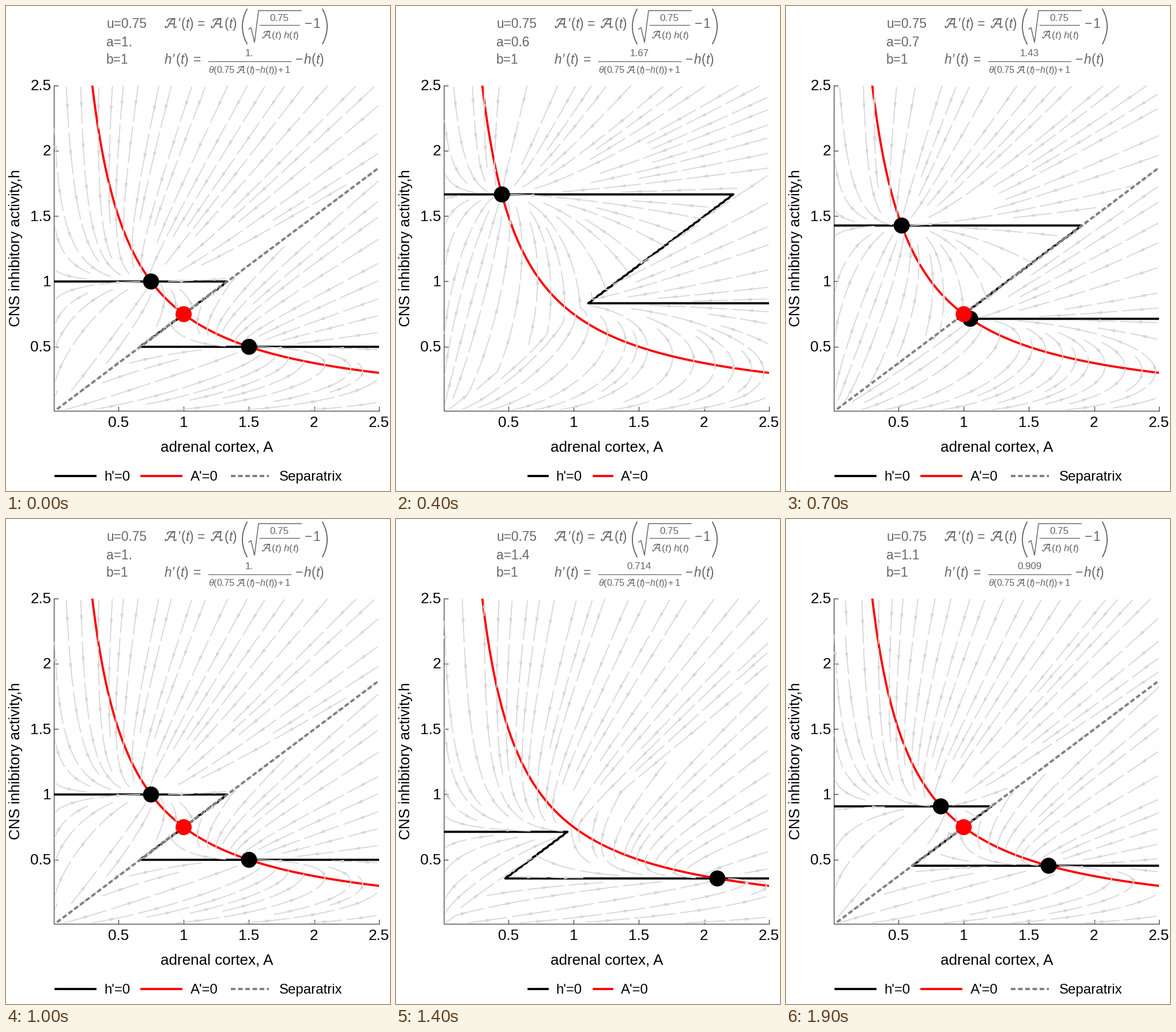
These frames come from a looping animation (666 by 841 pixels, 2000 ms). A matplotlib script:

```python
import math
from functools import lru_cache

import matplotlib.pyplot as plt
import numpy as np
from matplotlib.animation import FuncAnimation
from matplotlib.collections import LineCollection, PolyCollection
from matplotlib.patches import PathPatch, Rectangle
from matplotlib.path import Path

W, H, DPI = 666, 841, 100
PT = 72 / DPI
LEFT, RIGHT, TOP, BOTTOM = 83, 647, 137.5, 701.5
X0, Y0, UNIT = 81.7, 704.2, 226.5     # pixel place of the origin, pixels per unit
U = 0.75
GREY, PALE = "#666666", "#d7d7d7"
STEP, NEAR, APART = 4, 10, 18         # streamline spacing in pixels

plt.rcParams["font.family"] = "Liberation Sans"
fig = plt.figure(figsize=(W / DPI, H / DPI), dpi=DPI, facecolor="white")
ax = fig.add_axes([0, 0, 1, 1])
ax.set_xlim(0, W)
ax.set_ylim(H, 0)
ax.axis("off")
box = Rectangle((LEFT, TOP), RIGHT - LEFT, BOTTOM - TOP, fill=False, lw=0)
ax.add_patch(box)


def px(A):
    return X0 + UNIT * np.asarray(A)


def py(h):
    return Y0 - UNIT * np.asarray(h)


def say(x, y, text, size, color="black", **kw):
    return ax.text(x, y, text, fontsize=size * PT, color=color, va="baseline", **kw)


def line(x, y, width, color, clip=False, **kw):
    item = ax.plot(x, y, lw=width * PT, color=color, **kw)[0]
    if clip:
        item.set_clip_path(box)
    return item


def script_a(x, y, size):
    """Calligraphic capital A drawn with a pen: leg, top stroke, stem, bar."""
    pen = [(Path.MOVETO, 0.06, 0.12), (Path.CURVE4, 0.02, -0.06),
           (Path.CURVE4, 0.2, -0.04), (Path.CURVE4, 0.3, 0.16),
           (Path.CURVE4, 0.42, 0.38), (Path.CURVE4, 0.5, 0.64),
           (Path.CURVE4, 0.78, 0.69),
           (Path.MOVETO, 0.2, 0.5), (Path.CURVE4, 0.2, 0.66),
           (Path.CURVE4, 0.36, 0.69), (Path.CURVE4, 0.78, 0.69),
           (Path.LINETO, 0.72, 0.08), (Path.CURVE4, 0.72, -0.02),
           (Path.CURVE4, 0.82, -0.02), (Path.CURVE4, 0.9, 0.07),
           (Path.MOVETO, 0.34, 0.29), (Path.LINETO, 0.74, 0.29)]
    pts = [(x + u * size, y - v * size) for _, u, v in pen]
    ax.add_patch(PathPatch(Path(pts, [p[0] for p in pen]), fill=False, ec=GREY,
                           lw=0.082 * size * PT, capstyle="round",
                           joinstyle="round"))


def formula(y, size, *parts):
    """Place runs on one baseline; a leading '/' means italic, '@' the script A."""
    for x, text in parts:
        if text == "@":
            script_a(x, y, size)
        elif text[0] == "/":
            say(x, y, text[1:], size, GREY, style="italic")
        else:
            say(x, y, text, size, GREY)


def of_t(x, size):
    """The runs of '(t)' starting at x."""
    return (x, "("), (x + 0.333 * size, "/t"), (x + 0.611 * size, ")")


def num(v):
    s = f"{v:.3g}"
    return s if "." in s else s + "."


# ---- header ----
BIG, SMALL = 22.6, 17
say(174, 37.5, "u=0.75", BIG, GREY)
a_text = say(174, 69.5, "", BIG, GREY)
say(174, 100, "b=1", BIG, GREY)

formula(37.5, BIG, (275, "@"), (298, "′"), *of_t(304, BIG), (332, "="),
        (355, "@"), *of_t(379, BIG), (518, "−"), (532, "1"))
say(474, 26, "0.75", SMALL, GREY, ha="center")
formula(55.5, SMALL, (444, "@"), *of_t(461, SMALL), (482, "/h"), *of_t(491.5, SMALL))
line([440, 509], [33, 33], 1.3, GREY)
line([421, 425, 431, 438, 512], [40, 37.5, 63, 8, 8], 1.5, GREY)
t = np.linspace(-1, 1, 40)
line(410 + 8 * t**2, 35.5 + 30 * t, 1.9, GREY)
line(557 - 8 * t**2, 35.5 + 30 * t, 1.9, GREY)

formula(100, BIG, (275, "/h"), (288.5, "′"), *of_t(295, BIG), (325, "="),
        (502, "−"), (517, "/h"), *of_t(530, BIG))
top_text = say(422, 87, "", SMALL, GREY, ha="center")
line([351, 494], [96, 96], 1.3, GREY)
formula(116, SMALL - 1, (351, "/θ"), (360, "("), (365, "0.75"), (400, "@"),
        *of_t(416.5, SMALL - 1), (431, "−"), (440.5, "/h"),
        *of_t(450, SMALL - 1), (465, ")"), (471, "+"), (484, "1"))

# ---- axes ----
line([LEFT, LEFT, RIGHT], [TOP, BOTTOM, BOTTOM], 1.2, "#333333", zorder=1)
for v in (0.5, 1, 1.5, 2, 2.5):
    x = min(px(v), RIGHT)
    y = py(v) - 0.3
    line([x, x], [BOTTOM, BOTTOM - 7], 1.2, "#333333", zorder=1)
    line([LEFT, LEFT + 7], [y, y], 1.2, "#333333", zorder=1)
    say(x - 0.3, 729.5, f"{v:g}", 26, ha="center")
    say(78.5, y + 8.5, f"{v:g}", 26, ha="right")
say(365.5, 773, "adrenal cortex, A", 26, ha="center")
say(24, 420, "CNS inhibitory activity,h", 26, ha="center",
    rotation=90, rotation_mode="anchor")

# ---- curves ----
DASH = (0, (2.05, 1.15))
A = np.linspace(0.25, 2.52, 300)
h_null = line([], [], 3.8, "black", clip=True, zorder=2, solid_joinstyle="round")
line(px(A), py(U / A), 3.8, "red", clip=True, zorder=3)
separatrix = line(px([0.03, 2.52]), py([0.03 * U, 2.52 * U]), 3.9, "#808080",
                  clip=True, zorder=5.5, ls=DASH, dash_capstyle="butt")

streams = LineCollection([], colors=PALE, linewidths=1.8 * PT, zorder=5)
heads = PolyCollection([], facecolors=PALE, edgecolors="none", zorder=5)
for c in (streams, heads):
    ax.add_collection(c, autolim=False)
    c.set_clip_path(box)


def dot(color, z):
    d = plt.Circle((0, 0), 13.9, fc=color, lw=0, zorder=z)
    ax.add_patch(d)
    return d


high_dot, low_dot, mid_dot = dot("black", 6), dot("black", 6), dot("red", 7)
mid_dot.center = (px(1), py(U))

# ---- legend ----
marks = [line([], [], 3.8, "black"), line([], [], 3.8, "red")]
names = [say(0, 823, s, 24) for s in ("h'=0", "A'=0")]
extra = [line([390, 456], [815, 815], 3.9, "#808080", ls=DASH,
              dash_capstyle="butt"),
         say(474, 823, "Separatrix", 24)]


# ---- flow field ----
def flow(x, y, a):
    """Unit direction in pixels, or None close to rest."""
    A, h = (x - X0) / UNIT, (Y0 - y) / UNIT
    u = A * (math.sqrt(U / (A * h)) - 1)
    v = 1 / a / (1 + (U * A > h)) - h
    n = math.hypot(u, v)
    return None if n < 0.03 else (u / n, -v / n)


def crowded(x, y, taken, gap):
    if not len(taken):
        return False
    return ((taken[:, 0] - x)**2 + (taken[:, 1] - y)**2).min() < gap * gap


def trace(x, y, a, sign, taken):
    pts = []
    s = STEP * sign
    for _ in range(75):
        d = flow(x, y, a)
        if d is None:
            break
        d = flow(x + d[0] * s / 4, y + d[1] * s / 4, a)
        if d is None:
            break
        x, y = x + d[0] * s, y + d[1] * s
        if not (LEFT + 1 < x < RIGHT and TOP < y < BOTTOM - 1):
            break
        if crowded(x, y, taken, NEAR):
            break
        pts.append((x, y))
    return pts


def head(piece):
    m = len(piece) // 2
    d = piece[m + 1] - piece[m - 1]
    d = d / np.hypot(*d)
    side = np.array([-d[1], d[0]]) * 2.9
    back = piece[m] - 5.5 * d
    return [piece[m] + 5.5 * d, back + side, back - side]


@lru_cache(maxsize=None)
def field(a):
    rng = np.random.default_rng(4)
    seeds = rng.random((1100, 2)) * [RIGHT - LEFT - 6, BOTTOM - TOP - 6]
    seeds += [LEFT + 3, TOP + 3]
    taken = np.empty((0, 2))
    pieces, tips = [], []
    for x, y in seeds:
        if crowded(x, y, taken, APART):
            continue
        path = trace(x, y, a, -1, taken)[::-1] + [(x, y)] + trace(x, y, a, 1, taken)
        path = np.array(path)
        taken = np.vstack([taken, path])
        for piece in np.array_split(path, math.ceil(len(path) / 21)):
            piece = piece[:-1]
            if len(piece) < 3:
                continue
            pieces.append(piece)
            if len(piece) > 7:
                tips.append(head(piece))
    return pieces, tips


def level_set(a):
    """Z-shaped h nullcline with a slightly rough diagonal."""
    hi, lo = 1 / a, 0.5 / a
    h = np.linspace(hi, lo, max(8, int((hi - lo) * 70)))
    rough = 0.004 * (-1.0) ** np.arange(len(h))
    rough[[0, -1]] = 0
    A = np.concatenate([[0.005], h / U + rough, [2.52]])
    return px(A), py(np.concatenate([[hi], h, [lo]]))


def update(i):
    # the parameter swings 1 -> 0.5 -> 1.5 -> 1 in steps of a tenth
    k = (i + 5) % 20
    a = (5 + abs(k - 10)) / 10
    hi, lo = 1 / a, 0.5 / a

    a_text.set_text("a=" + num(a))
    top_text.set_text(num(hi))
    h_null.set_data(*level_set(a))
    pieces, tips = field(a)
    streams.set_segments(pieces)
    heads.set_verts(tips)

    has_high, has_low = U * U / hi < hi, U * U / lo > lo
    both = has_high and has_low
    high_dot.center = (px(U / hi), py(hi))
    low_dot.center = (px(U / lo), py(lo))
    high_dot.set_visible(has_high)
    low_dot.set_visible(has_low)
    for item in (mid_dot, separatrix, *extra):
        item.set_visible(both)

    starts, length, pad = ((84, 233.5), 72, 86) if both else ((228.5, 341), 35.5, 48.5)
    for mark, name, x in zip(marks, names, starts):
        mark.set_data([x + 1.5, x + length - 1.5], [815, 815])
        name.set_x(x + pad)
    return []


anim = FuncAnimation(fig, update, frames=20, interval=100, repeat=True,
                     repeat_delay=0, blit=False, cache_frame_data=False)
plt.show()
```
